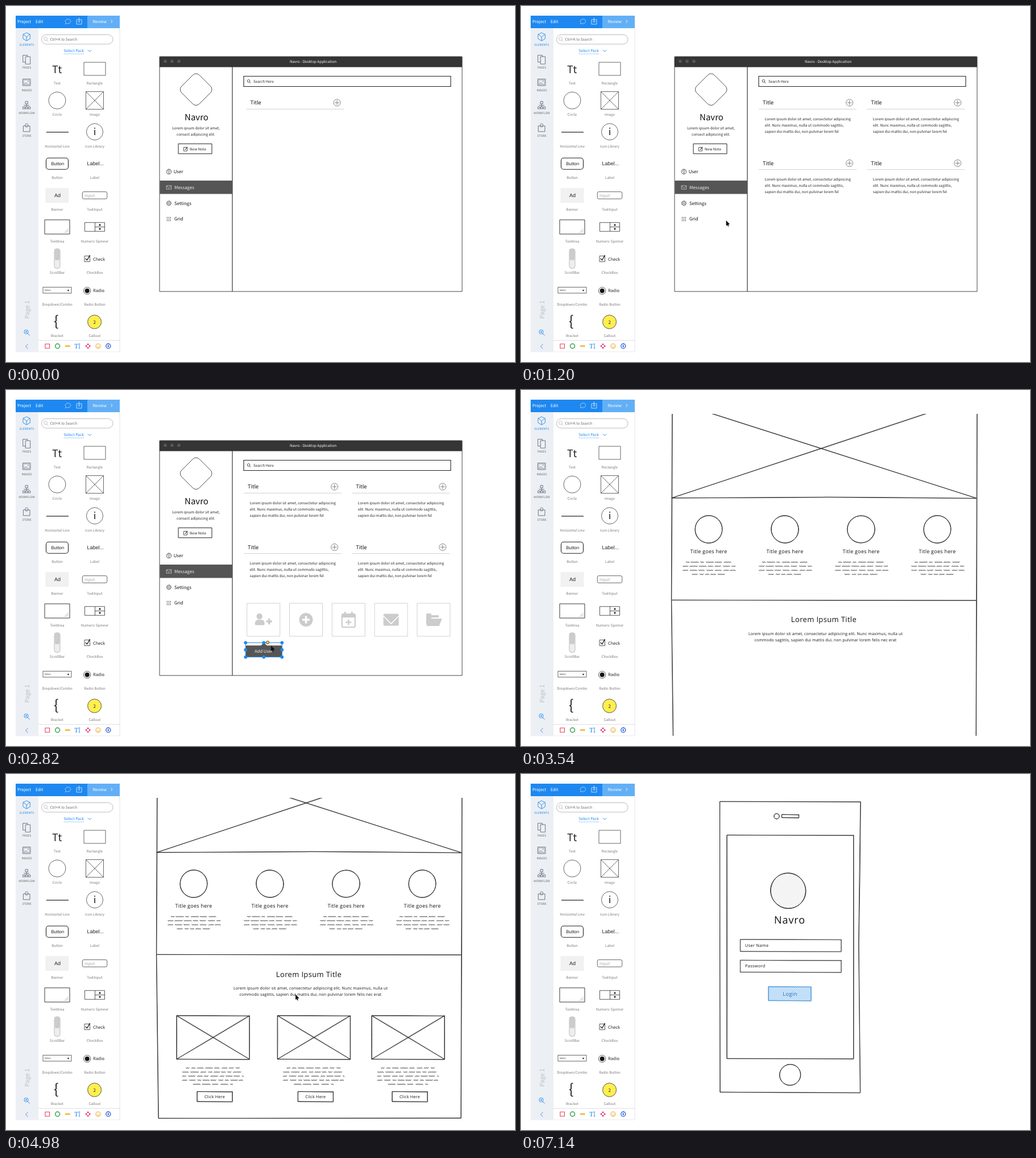
These frames come from a looping animation (895x626 px, 7.2 s). An HTML page with a canvas:

```html
<!DOCTYPE html>
<html lang="en">
<head>
<meta charset="utf-8">
<title>Wireframe editor</title>
<style>
html, body { margin: 0; width: 100%; height: 100%; overflow: hidden; background: #fff; }
canvas { display: block; width: 895px; height: 626px; }
</style>
</head>
<body>
<canvas id="stage"></canvas>
<script>
const W = 895, H = 626, LOOP = 7200, STEP = 60, BRAND = 'Navro';
const SANS = '"Noto Sans CJK JP", "Noto Sans CJK SC", "Noto Sans CJK", "Noto Sans", sans-serif';
const ARIAL = '"Liberation Sans", Arial, sans-serif';
const HAND = '"Open Sans", sans-serif';
const BLUE = '#1e88f0', INK = '#222', GREY = '#777', PALE = '#ccc', SIDE = '#667';

const canvas = document.getElementById('stage');
const c = canvas.getContext('2d');
const dpr = window.devicePixelRatio || 1;
canvas.width = W * dpr;
canvas.height = H * dpr;

// ---- drawing helpers ----
function at(x, y, draw, angle = 0) {
  c.save();
  c.translate(x, y);
  c.rotate(angle);
  draw();
  c.restore();
}
function clipTo(shape, draw) {
  c.save();
  c.beginPath();
  shape();
  c.clip();
  draw();
  c.restore();
}
function text(str, x, y, size, color = INK, o = {}) {
  c.font = `${o.weight || 400} ${size}px ${o.font || SANS}`;
  c.textAlign = o.align || 'left';
  c.letterSpacing = (o.gap || 0) + 'px';
  c.fillStyle = color;
  c.fillText(str, x, y);
  c.letterSpacing = '0px';
}
const mid = (str, x, y, size, color, o) => text(str, x, y, size, color, { ...o, align: 'center' });
const hand = (str, x, y, size, gap, o = {}) =>
  text(str, x, y, size, o.color || '#111', { font: HAND, weight: 500, gap, align: o.align || 'center' });

function stroke(color = INK, width = 1) {
  c.strokeStyle = color;
  c.lineWidth = width;
  c.stroke();
}
function paint({ fill, line, width = 0.9 }) {
  if (fill) { c.fillStyle = fill; c.fill(); }
  if (line) stroke(line, width);
}
function line(x1, y1, x2, y2, color, width = 0.9) {
  c.beginPath();
  c.moveTo(x1, y1);
  c.lineTo(x2, y2);
  stroke(color, width);
}
function box(x, y, w, h, style) {
  c.beginPath();
  c.roundRect(x, y, w, h, style.r || 0);
  paint(style);
}
const block = (w, h, style) => box(-w / 2, -h / 2, w, h, style);
function disc(x, y, r, style) {
  c.beginPath();
  c.arc(x, y, r, 0, 7);
  paint(style);
}
function ngon(x, y, r, n, turn, style) {
  c.beginPath();
  for (let i = 0; i < n; i++) {
    const a = (turn + i / n) * 2 * Math.PI;
    c.lineTo(x + r * Math.cos(a), y + r * Math.sin(a));
  }
  c.closePath();
  paint(style);
}
function chevron(x, y, r, color, quarter = 0, width = 0.9) {
  at(x, y, () => {
    c.beginPath();
    c.moveTo(-r, -r / 2);
    c.lineTo(0, r / 2);
    c.lineTo(r, -r / 2);
    stroke(color, width);
  }, quarter * Math.PI / 2);
}
function plus(x, y, r, color, width) {
  line(x - r, y, x + r, y, color, width);
  line(x, y - r, x, y + r, color, width);
}
function cross(x, y, w, h, draw) {
  draw(x, y, x + w, y + h);
  draw(x, y + h, x + w, y);
}
function lens(x, y, r, color, width = 0.8) {
  disc(x, y, r, { line: color, width });
  line(x + r * 0.7, y + r * 0.7, x + r * 1.7, y + r * 1.8, color, width);
}
function hatch(x, y, w, h, gap, color) {
  for (let u = -h; u < w; u += gap) line(x + u, y + h, x + u + h, y, color, 0.8);
}

// ---- motion ----
function ease(t, from, to) {
  const p = Math.min(1, Math.max(0, (t - from) / (to - from)));
  return p * p * (3 - 2 * p);
}
const glide = (t, from, to, a, b) => a + (b - a) * ease(t, from, to);
function drop(t, from, dx, dy, draw) {
  if (t < from) return;
  const left = 1 - ease(t, from, from + 240);
  at(dx * left, dy * left, draw);
}
// Cursor eases through [time, x, y] stops and hides outside of them.
function cursor(t, ...stops) {
  const i = stops.findIndex(s => s[0] > t);
  if (i < 1) return;
  const [from, x1, y1] = stops[i - 1], [to, x2, y2] = stops[i];
  at(glide(t, from, to, x1, x2), glide(t, from, to, y1, y2), () => {
    c.beginPath();
    c.lineTo(0, 0);
    c.lineTo(0, 9.2);
    c.lineTo(6.4, 6.5);
    c.closePath();
    paint({ fill: '#111' });
    line(2.2, 6.2, 4.2, 10.4, '#111', 1.7);
  });
}

// ---- hand-drawn shapes ----
function rough(x1, y1, x2, y2, color = INK, width = 1.1) {
  const len = Math.hypot(x2 - x1, y2 - y1);
  const bow = Math.sin(x1 * 12.9 + y1 * 7.3 + x2 * 3.1 + y2 * 5.7) * Math.min(1, len / 90);
  const nx = (y1 - y2) / len * bow, ny = (x2 - x1) / len * bow;
  for (const k of [1, -0.5]) {
    c.beginPath();
    c.moveTo(x1 + k * 0.3, y1 - k * 0.3);
    c.quadraticCurveTo((x1 + x2) / 2 + nx * k, (y1 + y2) / 2 + ny * k, x2 + k * 0.3, y2 + k * 0.3);
    stroke(color, width * 0.75);
  }
}
function roughBox(x, y, w, h, color, width) {
  for (const v of [0, h]) rough(x, y + v, x + w, y + v + 0.4, color, width);
  for (const u of [0, w]) rough(x + u, y, x + u, y + h, color, width);
}
function roughCircle(x, y, r) {
  for (const k of [0, 1]) {
    c.beginPath();
    for (let a = -1.8; a < 4.6; a += 0.15) {
      const q = r * (1 + Math.sin(a * 2 + k * 2 + x) * 0.014);
      c.lineTo(x + Math.cos(a) * q, y + Math.sin(a) * q);
    }
    stroke(INK, 0.9);
  }
}
function random(seed) {
  return () => (seed = (seed * 16807) % 2147483647) / 2147483647;
}
// Centred lines of squiggled words; the outer lines are shorter.
function scribble(cx, y, rows, w) {
  const rnd = random(rows * 977);
  for (let i = 0; i < rows; i++) {
    const half = w / 2 * (i === rows - 1 ? 0.65 : i ? 1 : 0.88), ly = y + i * 7.15;
    for (let x = cx - half; x < cx + half - 3;) {
      const end = Math.min(cx + half, x + 6 + rnd() * 9);
      c.beginPath();
      for (let u = x; u <= end; u += 0.5) c.lineTo(u, ly + Math.sin(u * 2.2 + i) * 0.8);
      stroke(INK, 0.9);
      x = end + 2 + rnd() * 2;
    }
  }
}

// ---- selection ----
function select(x, y, w, h) {
  box(x, y, w, h, { line: BLUE, width: 1 });
  for (const v of [0, 0.5, 1]) for (const u of [0, 0.5, 1])
    if (u !== 0.5 || v !== 0.5) disc(x + w * u, y + h * v, 2.9, { fill: BLUE });
}
const anchor = (x, y) => disc(x, y, 2.7, { fill: '#f7c945', line: '#444' });

// ---- left panel ----
function header() {
  box(17, 17, 126, 22, { fill: BLUE });
  box(143, 17, 57, 22, { fill: '#62aff6' });
  text('Project', 20, 29.6, 7.3, '#fff');
  text('Edit', 52, 29.6, 7.3, '#fff');
  text('Review', 152.5, 29.6, 7.3, '#fff');
  chevron(185.7, 27, 2.5, '#fff', 3);
  c.beginPath();
  c.ellipse(109, 27, 4.8, 4, 0, 2.4, 8.2);
  c.lineTo(104.5, 31.5);
  c.closePath();
  stroke('#b9dcff', 0.8);
  box(124, 24, 9, 8, { line: '#cfe7ff' });
  line(128.5, 20.5, 128.5, 28.5, '#cfe7ff');
  chevron(128.5, 27.8, 2, '#cfe7ff');
}
const tabs = [
  ['ELEMENTS', () => {
    ngon(0, 0, 7.2, 6, 0.25, { line: BLUE });
    chevron(0, -2, 6.2, BLUE);
    line(0, 1, 0, 7, BLUE);
  }],
  ['PAGES', () => {
    box(-6.5, -7.5, 8, 12, { line: SIDE });
    box(-2, -5, 8.5, 13, { fill: '#eceff4', line: SIDE });
  }],
  ['IMAGES', () => {
    block(13.5, 11.5, { line: SIDE });
    block(10, 8, { line: SIDE, width: 0.5 });
    chevron(-1, 2, 3, SIDE, 2);
    disc(2.5, -2, 0.8, { fill: SIDE });
  }],
  ['WORKFLOW', () => {
    box(-2.2, -6.5, 4.4, 4, { line: SIDE });
    line(0, -2.5, 0, 3, SIDE);
    line(-4.8, 0.3, 4.8, 0.3, SIDE);
    for (const x of [-4.8, 0, 4.8]) box(x - 1.8, 3, 3.6, 3.6, { line: SIDE });
  }],
  ['STORE', () => {
    box(-5.8, -3.5, 11.6, 10, { line: SIDE });
    box(-2.5, -7.5, 5, 6, { line: SIDE, width: 0.8, r: 2.4 });
  }]
];
function sidebar() {
  box(17, 39, 40, 569, { fill: '#eceff4' });
  tabs.forEach(([name, draw], i) => {
    at(36.2, 54 + 40.1 * i, draw);
    mid(name, 36.5, 70 + 40.1 * i, 5.1, i ? '#666' : BLUE);
  });
  at(41, 550, () => text('Page 1', 0, 0, 10.6, '#bbbfc5'), -Math.PI / 2);
  lens(35.5, 573, 3.6, BLUE, 0.9);
  plus(35.5, 573, 1.8, BLUE, 0.8);
  chevron(36.5, 598.8, 4, BLUE, 1);
}
const elements = [
  ['Text', () => mid('Tt', -0.3, 7.3, 18, INK, { weight: 500 })],
  ['Rectangle', () => block(38, 23, { line: '#555' })],
  ['Circle', () => disc(0, 0, 15, { line: '#555' })],
  ['Image', () => {
    block(31, 31, { line: '#555' });
    cross(-15.5, -15.5, 31, 31, (...ends) => line(...ends, '#555'));
  }],
  ['Horizontal Line', () => line(-19, 0.2, 20, 0.2, INK, 1.2)],
  ['Icon Library', () => {
    disc(0, -0.5, 14.5, { line: '#555' });
    mid('i', 0, 5.5, 17, INK, { weight: 500 });
  }],
  ['Button', () => {
    block(39, 20, { line: INK, width: 1.1, r: 4.5 });
    mid('Button', 0.7, 3, 8, INK, { font: ARIAL });
  }],
  ['Label', () => mid('Label...', 1.3, 3, 9, INK, { font: ARIAL })],
  ['Banner', () => {
    block(41, 26, { fill: '#f1f1f1' });
    mid('Ad', 0.5, 3, 9, INK, { font: ARIAL });
  }],
  ['TextInput', () => {
    block(43.5, 12.5, { line: '#555', r: 2.5 });
    text('Input', -18, 3, 7.4, '#aaa');
  }],
  ['TextArea', () => {
    block(44, 25, { line: INK });
    for (const k of [3, 6]) line(19 - k, 10.5, 19.5, 10.5 - k * 1.2, GREY, 0.6);
  }],
  ['Numeric Spinner', () => {
    block(35, 15.5, { line: '#444' });
    line(0.5, -7.7, 0.5, 7.7, '#444');
    line(0.5, 0, 17.5, 0, '#444');
    for (const s of [-1, 1]) ngon(9, s * 3.4, 2.4, 3, s / 4, { fill: '#111' });
  }],
  ['ScrollBar', () => {
    block(10, 34.5, { fill: '#eee', line: '#aaa', width: 0.8, r: 4 });
    box(-4.5, -16.5, 9, 19.5, { fill: PALE, r: 3.5 });
  }],
  ['CheckBox', () => {
    box(-18, -4.5, 9.5, 10, { line: '#444' });
    line(-16.2, -0.3, -13.5, 3, '#111', 1.2);
    line(-13.5, 3, -8.4, -6, '#111', 1.2);
    text('Check', -3, 3.5, 7.4);
  }],
  ['Dropdown/Combo', () => {
    block(50, 10.5, { line: '#555' });
    text('Select', -22, 1.3, 3.7);
    ngon(19.5, 0.3, 1.9, 3, 0.25, { fill: INK });
  }],
  ['Radio Button', () => {
    disc(-13.3, 1, 6.2, { line: '#444' });
    disc(-13.3, 1, 4, { fill: '#111' });
    text('Radio', -3, 3.7, 7.4);
  }],
  ['Bracket', () => mid('{', -1.7, 7.5, 25, INK, { weight: 500 })],
  ['Callout', () => {
    disc(-0.4, 0.2, 12, { fill: '#ffef4d', line: '#444' });
    mid('2', -0.2, 3.2, 8);
  }]
];
function library() {
  box(62.5, 50.5, 125.5, 16.5, { line: '#aaa', width: 0.8, r: 8.2 });
  lens(69.5, 57.6, 3, '#aaa', 0.7);
  text('Ctrl+K to Search', 77.5, 61.2, 6.4, '#666');
  text('Select Pack', 101.5, 81.2, 6.7, BLUE);
  c.setLineDash([2, 1]);
  line(101.5, 84.2, 137, 84.2, BLUE, 0.6);
  c.setLineDash([]);
  chevron(147, 78.8, 3.2, BLUE);
  elements.forEach(([name, draw], i) => {
    const x = 90 + 66 * (i % 2), y = 110.5 + 55.6 * Math.floor(i / 2);
    at(x, y, draw);
    mid(name, x, y + 27, 6.18, GREY);
  });
}
const tools = [
  () => block(7.5, 7.5, { line: '#e5405a', width: 1.1 }),
  () => disc(0, 0, 4, { line: '#35a04a', width: 1.5 }),
  () => block(8.5, 2.6, { fill: '#f5b22a' }),
  () => {
    text('T', -5.9, 4.2, 11, BLUE, { weight: 500, font: '"Noto Serif", serif' });
    line(2.8, -4, 2.8, 4, BLUE);
    for (const y of [-4, 4]) line(1.5, y, 4.1, y, BLUE, 0.8);
  },
  () => {
    for (let k = 0; k < 4; k++)
      at(0, 0, () => ngon(3, 0, 2.2, 3, 0, { fill: '#e8245e' }), k * Math.PI / 2);
  },
  () => {
    disc(0, 0, 4.2, { line: '#f0a71f', width: 1 });
    for (const x of [-1.5, 1.5]) disc(x, -1.2, 0.6, { fill: '#e39a10' });
    c.beginPath();
    c.arc(0, 0.3, 2.2, 0.2, 2.9);
    stroke('#e39a10', 0.8);
  },
  () => {
    disc(0, 0, 4, { line: '#2859d8', width: 1.3 });
    disc(0, 0, 1.5, { fill: '#2859d8' });
  }
];
function panel() {
  box(57, 39, 143, 569, { fill: '#fff' });
  line(200, 39, 200, 608, '#dcdfe4', 0.8);
  line(17, 608, 200, 608, '#e4e6ea', 0.8);
  sidebar();
  header();
  library();
  line(57, 588, 200, 588, '#cfd4dc', 0.8);
  tools.forEach((draw, i) => at(72.7 + 17.85 * i, 598, draw));
}

// ---- desktop application ----
function envelope(w, h, color) {
  block(w, h, { line: color, width: 0.7 });
  chevron(0, -h / 8, w / 2, color, 0, 0.7);
}
const menu = [
  ['User', () => {
    disc(0, 0, 4.3, { line: '#333', width: 0.8 });
    disc(0, -1, 1.9, { line: '#333', width: 0.7 });
    chevron(0, 3, 2, '#333', 2, 0.7);
  }],
  ['Messages', () => envelope(8.6, 6.2, '#ddd')],
  ['Settings', () => {
    disc(0, 0, 3.5, { line: '#333', width: 0.7 });
    disc(0, 0, 1.5, { line: '#333', width: 0.7 });
    c.setLineDash([1.4, 1.7]);
    disc(0, 0, 4.1, { line: '#333', width: 1 });
    c.setLineDash([]);
  }],
  ['Grid', () => {
    for (let i = 0; i < 9; i++) box((i % 3) * 2.9 - 3.6, Math.floor(i / 3) * 2.9 - 3.6, 1.4, 1.4, { fill: '#444' });
  }]
];
function appFrame() {
  box(270, 89, 532, 413, { line: '#444', width: 1 });
  box(270, 89, 532, 18.5, { fill: '#353535', r: [2, 2, 0, 0] });
  for (let i = 0; i < 3; i++) disc(280 + 12 * i, 97.2, 2.8, { fill: '#585858' });
  mid(BRAND + ' - Desktop Application', 540, 99.8, 6.35, '#fff');
  line(398, 107, 398, 502, '#333', 1.2);
  at(334.2, 146.8, () => block(44, 44, { line: '#444', r: 8 }), Math.PI / 4);
  mid(BRAND, 335, 200.6, 15, '#111');
  mid('Lorem ipsum dolor sit amet,', 334, 217.3, 6.4);
  mid('consect adipiscing elit.', 334, 228, 6.4);
  box(303, 242.3, 59, 17.5, { line: INK, width: 1 });
  box(312.5, 248.5, 6, 6.5, { line: '#444' });
  line(314.8, 252.8, 319.3, 247.8, '#444', 1.1);
  text('New Note', 323, 253.6, 6.4);

  box(270.5, 307, 127.5, 23.5, { fill: '#555' });
  menu.forEach(([name, draw], i) => {
    const y = 291.2 + 27.8 * i;
    at(286.4, y, draw);
    text(name, i ? 296 : 294.7, y + 2.7, 7.9, i === 1 ? '#eee' : '#111');
  });

  box(418, 123.5, 364, 18, { line: INK, width: 1.1 });
  lens(426.5, 131.8, 2.3, INK);
  text('Search Here', 435, 134.8, 6.35);
}
function noteHead() {
  text('Title', 425, 173.3, 9.2, '#111');
  disc(577.6, 170, 6, { line: '#666', width: 0.8 });
  plus(577.6, 170, 4, '#666', 0.8);
  line(418, 181.3, 590, 181.3, PALE);
}
function noteBody() {
  ['Lorem ipsum dolor sit amet, consectetur adipiscing', 'elit. Nunc maximus, nulla ut commodo sagittis,',
    'sapien dui mattis dui, non pulvinar lorem fel']
    .forEach((s, i) => text(s, 428.6, 200.6 + i * 11.2, 6.35));
}
const glyphs = [
  () => {
    disc(-7, -6, 5.2, { fill: PALE });
    box(-15, 0, 17, 9.5, { fill: PALE, r: [6, 6, 2, 2] });
    plus(10, 3, 6, '#fff', 6);
    plus(10, 3, 5.2, PALE, 3.4);
  },
  () => {
    disc(0, 0, 12, { fill: PALE });
    plus(0, 0, 6.5, '#fff', 3.4);
  },
  () => {
    box(-11.5, -10, 23, 23, { line: PALE, width: 2.2, r: 2 });
    box(-12, -10, 24, 6, { fill: PALE });
    for (const x of [-6, 6]) box(x - 1.5, -14, 3, 7, { fill: PALE, r: 1 });
    plus(0, 4.5, 5, PALE, 2.4);
  },
  () => {
    block(27, 21, { fill: PALE, r: 2.5 });
    chevron(0, 0, 14, '#fff', 0, 1.6);
  },
  () => {
    box(-13, -11, 9, 20, { fill: PALE, r: 1 });
    box(-13, -8, 22, 4, { fill: PALE, r: 1 });
    c.transform(1, 0, -0.4, 1, 0, 0);
    box(-8, -2, 22, 13, { fill: PALE });
  }
];
function desktop(t) {
  appFrame();
  at(glide(t, 0, 120, 4.5, 0), 0, noteHead);
  drop(t, 180, -40, 18, noteBody);
  for (let i = 1; i < 4; i++)
    if (t >= 480 + 180 * i) at((i % 2) * 190.2, Math.floor(i / 2) * 106.4, () => { noteHead(); noteBody(); });

  glyphs.forEach((draw, i) => {
    if (t >= 1620 + i * 150) at(452.7 + i * 74.8, 404, () => {
      block(58, 58, { line: PALE });
      draw();
    });
  });
  drop(t, 2520, 0, 30, () => {
    box(421.5, 449.3, 64, 20.2, { fill: '#555' });
    ngon(453.5, 449.5, 5.4, 4, 0, { fill: '#555' });
    mid('Add User', 453, 462, 7.5, '#eee');
    if (t >= 3000) return;
    select(421.3, 444.3, 64, 25.3);
    anchor(460, 444);
  });
  cursor(t, [120, 470, 200], [600, 690, 210], [1200, 360.6, 377], [1620, 452, 408],
    [2220, 752, 408], [2820, 466, 449.5], [3060, 530, 470]);
}

// ---- sketched web page ----
function card(selected) {
  roughBox(300, 425, 128, 76.5);
  cross(300, 425, 128, 76.5, rough);
  scribble(364, 517, 5, 108);
  roughBox(336, 558.5, 62, 17.5);
  hand('Click Here', 367, 570.2, 7.2, 0.25);
  if (selected) select(300.5, 426, 127, 150);
}
function page(t) {
  const scroll = glide(t, 3420, 3780, 81, -31) + glide(t, 4800, 4980, 0, 31) + glide(t, 4980, 5280, 0, 81);
  clipTo(() => c.rect(255, 42, 560, 566), () => {
    c.translate(0, scroll);
    rough(265, -39, 801, -39);
    rough(265, 138, 801, -40);
    rough(265, -33, 800, 138);
    for (const half of [265, 533]) rough(half, half < 300 ? 138 : 136.5, half + 268, half < 300 ? 136.5 : 138.5);
    rough(266, -39, 264.5, 318);
    rough(264.5, 318, 268, 605);
    rough(802, -39, 800, 605);
    rough(265, 317.5, 800, 318);
    rough(268, 605.5, 800, 605);
    for (let k = 0; k < 4; k++) {
      const x = 330 + 134 * k;
      roughCircle(x, 193, 24);
      hand('Title goes here', x, 235.3, 9, 0.25);
      scribble(x + 1, 250.8, 4, 93);
    }
    hand('Lorem Ipsum Title', 532.5, 356.5, 13, 0.35);
    hand('Lorem ipsum dolor sit amet, consectetur adipiscing elit. Nunc maximus, nulla ut', 535.5, 379.3, 7, 0.15);
    hand('commodo sagittis, sapien dui mattis dui, non pulvinar lorem felis nec erat', 535.5, 389.8, 7, 0.15);
    drop(t, 3900, -90, 20, () => card(t < 4380));
    drop(t, 4380, -177.3, 0, () => at(177.3, 0, () => card(t < 4620)));
    drop(t, 4620, -165.7, 0, () => at(343, 0, () => card(t < 4920)));
  });
  cursor(t, [3840, 156, 430], [4140, 381, 448], [4380, 381, 448], [4620, 558, 448],
    [4800, 723, 448], [4980, 509, 387.5], [5280, 509, 387.5]);
}

// ---- sketched phone ----
function field(label, y, h) {
  roughBox(385.5, y, 177.5, h, '#333', 1);
  hand(label, 394, y + h / 2 + 2.4, 7.3, 0.35, { align: 'left' });
}
function shell() {
  rough(349.5, 48.5, 597, 49);
  rough(597, 49, 593.8, 300);
  rough(593.8, 300, 596.5, 560);
  rough(350, 559.5, 596.5, 560.5);
  rough(349.5, 48.5, 350, 559.5);
  roughBox(362, 107.5, 222.7, 393);
  roughCircle(449.5, 74.3, 4.6);
  roughBox(458.5, 71.3, 30, 5.4);
  roughCircle(473.2, 529, 18.4);
  clipTo(() => c.arc(469.8, 205.3, 30.5, 0, 7), () => {
    box(438, 174, 64, 64, { fill: '#fafafa' });
    hatch(438, 174, 64, 64, 3.2, '#e4e4e4');
  });
  roughCircle(469.8, 205.3, 31);
  hand(BRAND, 472.5, 263, 18, 0.9);
}
function login() {
  box(435, 374, 75, 24.5, { fill: '#d6eafb' });
  clipTo(() => c.rect(435, 374, 75, 24.5), () => hatch(435, 374, 75, 24.5, 3.4, '#84bdef'));
  roughBox(435, 374, 75, 24.5, '#3f90da');
  hand('Login', 473, 389.8, 9.3, 0.4, { color: '#2a6db5' });
}
function phone(t) {
  shell();
  drop(t, 5580, -70, 25, () => {
    const y = glide(t, 6000, 6120, 286, 291), h = glide(t, 6000, 6120, 19.3, 21);
    field('User Name', y, h);
    if (t >= 6120) return;
    select(385.8, y + 0.2, 176.8, h);
    anchor(480.8, y);
  });
  drop(t, 6180, 0, -36.5, () => {
    field(t < 6480 ? 'User Name' : 'Password', 327.5, 21);
    if (t < 6540) select(385.8, 327.5, 176.8, 21);
  });
  drop(t, 6600, -90, -20, () => {
    login();
    if (t < 6900) select(435, 374, 75, 24.5);
  });
  cursor(t, [6120, 470, 302], [6420, 470, 338], [6600, 384, 367], [6840, 474, 387], [6900, 474, 387]);
}

function frame(now) {
  const t = Math.floor((now % LOOP) / STEP) * STEP;
  c.setTransform(dpr, 0, 0, dpr, 0, 0);
  c.textRendering = 'geometricPrecision';
  c.fillStyle = '#fff';
  c.fillRect(0, 0, W, H);
  if (t < 3300) desktop(t);
  else if (t < 5400) page(t);
  else phone(t);
  panel();
  requestAnimationFrame(frame);
}
requestAnimationFrame(frame);
</script>
</body>
</html>
```
